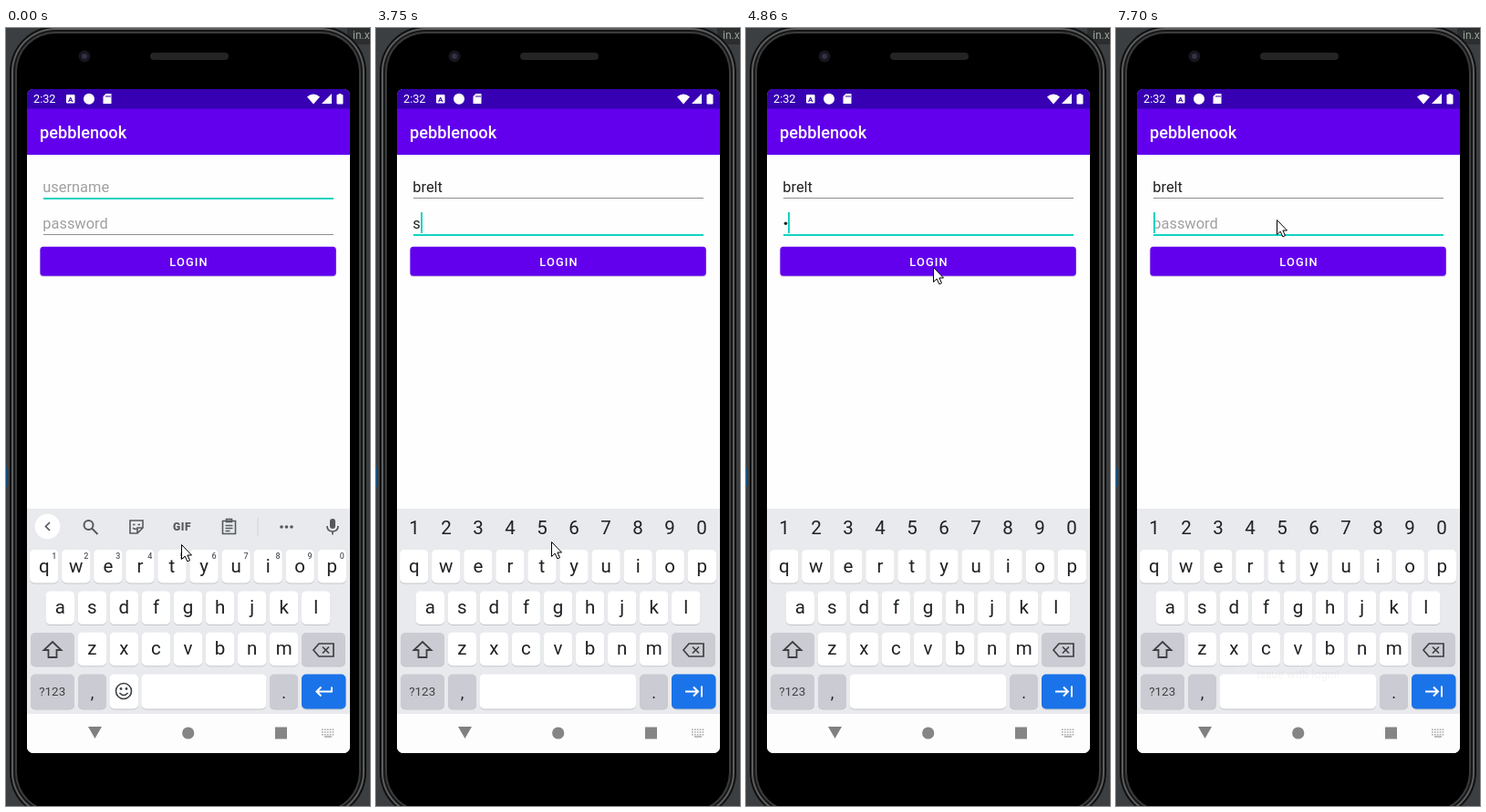
These frames come from a looping animation (399x853 px, 8000 ms). An HTML page with a canvas:

```html
<!DOCTYPE html>
<html lang="en">
<head>
<meta charset="utf-8">
<title>Login screen</title>
<style>
  html, body { margin: 0; width: 100%; height: 100%; overflow: hidden; background: #3c3f41; }
  canvas { display: block; }
</style>
</head>
<body>
<canvas id="stage" width="399" height="853"></canvas>
<script>
const ctx = document.getElementById('stage').getContext('2d');
const LOOP = 8000, BLINK = 495;
const TEAL = '#14d3bf', PURPLE = '#6200ee', INK = '#202124', ICON = '#55585d', GREY = '#cbccd3';
const USER = 'brelt', APP = 'pebblenook', FIELD_SIZE = 16.4;

// Story beats in ms
const FIRST_KEY = 680, NEXT_KEYS = 980, KEY_GAP = 130, FOCUS_PASSWORD = 1770;
const SECRET_KEY = 2760, SECRET_HIDDEN = 4350, FIELD_CLICK = 6710, SECRET_ERASED = 7340;
const PRESS = 4650, TOAST_IN = 4980, TOAST_OUT = 7720;
// Pointer moves: start, end, destination
const MOVES = [[3710, 4470, 203, 249], [4560, 5370, 211, 292], [6170, 6290, 211, 284], [6290, 6560, 176, 210]];

const clamp = (v, lo = 0, hi = 1) => Math.min(hi, Math.max(lo, v));
const smooth = k => k * k * (3 - 2 * k);

function box(x, y, w, h, fill, r = 0) {
  ctx.fillStyle = fill;
  ctx.beginPath();
  ctx.roundRect(x, y, w, h, r);
  ctx.fill();
}
function disc(x, y, r, fill) {
  ctx.fillStyle = fill;
  ctx.beginPath();
  ctx.arc(x, y, r, 0, 7);
  ctx.fill();
}
function shape(d, x, y, { fill, stroke, width = 1.7 }) {
  const path = new Path2D(d);
  ctx.save();
  ctx.translate(x, y);
  if (fill) { ctx.fillStyle = fill; ctx.fill(path); }
  if (stroke) { ctx.strokeStyle = stroke; ctx.lineWidth = width; ctx.stroke(path); }
  ctx.restore();
}
function label(str, x, y, size, color = INK, align = 'center', weight = 400, spacing = 0) {
  ctx.font = `${weight} ${size}px Roboto, sans-serif`;
  ctx.letterSpacing = spacing + 'px';
  ctx.textAlign = align;
  ctx.fillStyle = color;
  ctx.fillText(str, x, y);
}
function textWidth(str) {
  ctx.font = `400 ${FIELD_SIZE}px Roboto, sans-serif`;
  ctx.letterSpacing = '0px';
  return ctx.measureText(str).width;
}

// Letters of the user name entered by time t
function typedCount(t) {
  if (t < FIRST_KEY) return 0;
  return clamp(2 + Math.floor((t - NEXT_KEYS) / KEY_GAP), 1, USER.length);
}
// The caret restarts its blink at every edit
function caretOn(t) {
  const keys = [...USER].map((_, i) => i ? NEXT_KEYS + (i - 1) * KEY_GAP : FIRST_KEY);
  const edits = [370 - 2 * BLINK, ...keys, FOCUS_PASSWORD - 95, SECRET_KEY, FIELD_CLICK, SECRET_ERASED];
  const last = edits.findLast(e => t >= e);
  return Math.floor((t - last) / BLINK) % 2 === 0;
}

function drawPhone() {
  box(0, 0, 399, 853, '#3c3f41');
  box(374, 0, 25, 18, '#2b2d2e');
  box(0, 482, 1.5, 20, '#0d4f82');
  label('in.x', 380, 12, 12, '#9aa39a', 'left');
  ['#101010', '#5c5e60', '#161616', '#3a3b3c', '#000'].forEach((color, i) => {
    const inset = 2 * i;
    box(4 + inset, inset - 2, 391 - 2 * inset, 868 - 2 * inset, color, 50 - inset);
  });
  disc(86, 31, 6.5, '#17171c');
  disc(86, 31, 3, '#30324a');
  box(158, 27, 86, 8, '#242424', 4);
}

function drawBars() {
  box(23, 67, 354, 728, '#fefefe');
  box(23, 67, 354, 72, PURPLE);
  box(23, 67, 354, 21.6, '#3700b3');
  label(APP, 37, 121, 18.2, '#fff', 'left', 500);
  label('2:32', 30, 82, 12.7, '#fff', 'left');
  box(66, 73, 9.5, 9.5, '#fff', 1);
  label('A', 70.8, 81, 8, '#3700b3', 'center', 700);
  disc(91, 77.8, 6, '#fff');
  shape('M3 0H9V11H0V3Z', 106.5, 72, { fill: '#fff' });
  shape('M3.500 2V4M5.500 2V4M7.500 2V4', 106.5, 72, { stroke: '#3700b3', width: 1 });
  shape('M0 3Q7 -3 14 3L7 11Z', 330, 72.5, { fill: '#fff' });
  shape('M11 0V11H0Z', 346, 72, { fill: '#fff' });
  box(362.5, 73, 7, 10.5, '#fff', 1);
  box(364.5, 72, 3, 2, '#fff');

  box(23, 752, 354, 43, '#fdfdfd');
  shape('M0 0H15L7.500 13Z', 90, 766, { fill: '#808080' });
  disc(199.7, 773, 6.6, '#858585');
  box(295, 766.5, 13, 13, '#858585');
  for (let i = 0; i < 15; i++)
    box(346 + i % 5 * 2.9, 768.5 + Math.floor(i / 5) * 2.7, 1.7, 1.5, '#aaa');
  box(349, 776.3, 8, 1.4, '#aaa');
}

function field(y, { text, hint, focused, caret, composed, masked }) {
  const x = 40.3;
  if (masked) disc(43.5, y + 0.3, 1.8, INK);
  else label(text || hint, x, y + 6, FIELD_SIZE, text ? '#212121' : '#a0a0a0', 'left');
  if (composed) box(x, y + 7, textWidth(composed), 1, '#333');
  box(41, y + 12, 318, focused ? 2 : 1, focused ? TEAL : '#8e8e8e');
  if (caret) box(Math.round(x + textWidth(masked ? '•' : text) + 0.2), y - 12, 2, 23, TEAL);
}

function drawButton(t) {
  box(37.5, 241, 324, 31.8, '#cfc8da', 3.5);
  box(37.4, 239.8, 324.4, 32, PURPLE, 3.5);
  const press = clamp(2 - Math.abs(t - PRESS) / 105);
  box(37.4, 239.8, 324.4, 32, `rgba(255,255,255,${0.25 * press})`, 3.5);
  label('LOGIN', 200.5, 261, 12.75, '#fff', 'center', 500, 1.14);
}

function key(x, y, w, fill = '#fff') {
  const h = y > 700 ? 38 : 36.5;
  box(x, y + 1, w, h, '#c3c5c9', 5);
  box(x, y, w, h, fill, 5);
}

function drawToolbar() {
  shape('M3 -4.500L-1.500 0L3 4.500', 45, 546.5, { stroke: ICON });
  shape('M5 0A5 5 0 1 1 -5 0A5 5 0 1 1 5 0M3.500 3.500L10 10', 90.5, 545, { stroke: ICON, width: 2 });
  shape('M0 0H14V8L8 14H0ZM14 8H8V14M3 4.500H5.500M8.500 4.500H11M3 8Q5 10 7 9', 136, 540, { stroke: ICON, width: 1.6 });
  label('GIF', 193, 550.5, 12, ICON, 'center', 900, 0.6);
  shape('M0 2H14V16H0ZM4 3H10V0H4ZM3 7H11M3 10H11M3 13H8', 237.5, 538.5, { stroke: ICON, width: 1.6 });
  box(275.5, 537, 1, 20, '#cfd1d5');
  for (const dx of [-5.5, 0, 5.5]) disc(307.5 + dx, 547, 1.8, ICON);
}
function drawSuggestions(words) {
  shape('M-2 -4.500L2.500 0L-2 4.500', 45, 546.5, { stroke: ICON });
  words.forEach((word, i) => {
    label(word, 107 + 95 * i, 552, 15.5);
    if (i) box(58 + 95 * i, 538, 1, 18, '#cfd1d5');
  });
}
function drawStrip(typed) {
  disc(45.5, 546.5, 13.8, '#fff');
  if (typed < 3) drawToolbar();
  else drawSuggestions(typed < USER.length ? ['bread', 'break', 'brew'] : [USER, 'belt', 'built']);
  box(355, 538, 6, 11, ICON, 3);
  shape('M-6 0Q-6 6 0 6Q6 6 6 0M0 6V9.500', 358, 546, { stroke: ICON });
}

function drawKeyboard(password, typed) {
  box(23, 527, 354, 225, '#e8eaed');
  if (password) [...'1234567890'].forEach((digit, i) => label(digit, 42 + 35 * i, 554.5, 20.5));
  else drawStrip(typed);

  ['qwertyuiop', 'asdfghjkl', 'zxcvbnm'].forEach((row, r) => {
    const y = 572 + 45.4 * r;
    [...row].forEach((letter, i) => {
      const x = 199.5 + 35.05 * (i - (row.length - 1) / 2);
      key(x - 15.7, y, 31.4);
      label(letter, x, y + 24.5, 20.5);
      if (!r && !password) label((i + 1) % 10, x + 11, y + 10, 9, ICON, 'center', 500);
    });
  });

  key(27, 663, 48, GREY);
  shape('M0 -9L9.500 0H4.500V8H-4.500V0H-9.500Z', 51, 682, { stroke: '#3c4043', width: 1.8 });
  key(324, 663, 48, GREY);
  shape('M-5 -7H11V7H-5L-11 0ZM-1 -3.500L6 3.500M6 -3.500L-1 3.500', 348, 682, { stroke: '#3c4043' });
  key(27, 708.5, 48, GREY);
  label('?123', 50.7, 732, 13.4, '#3c4043');
  key(79, 708.5, 31, GREY);
  label(',', 94.5, 735, 18);
  key(289, 708.5, 31, GREY);
  label('.', 304.5, 735, 18);
  if (password) key(113.5, 708.5, 171.5);
  else {
    key(113.5, 708.5, 31.5);
    key(148.3, 708.5, 137);
    shape('M8.500 0A8.500 8.500 0 1 1 -8.500 0A8.500 8.500 0 1 1 8.500 0M-4.500 2Q0 7 4.500 2', 129, 727, { stroke: '#3c4043', width: 1.6 });
    for (const dx of [-3, 3]) disc(129 + dx, 724.5, 1.4, '#3c4043');
  }
  key(324, 708.5, 48.5, '#1a73e8');
  shape(password ? 'M-9 0H5M0 -5L5 0L0 5M9 -6V6' : 'M9 -5V0H-7M-2.500 -5L-7.500 0L-2.500 5', 348, 727.5, { stroke: '#fff', width: 2 });
}

function drawToast(t) {
  ctx.globalAlpha = clamp((t - TOAST_IN) / 500) * clamp((TOAST_OUT - t) / 400);
  box(132, 685, 135.5, 45, 'rgba(237,237,238,.97)', 22.5);
  label('Issue with login!', 154, 713, 12.7, '#222', 'left');
  ctx.globalAlpha = 1;
}

function drawPointer(t) {
  let x = 192, y = 566;
  for (const [start, end, toX, toY] of MOVES) {
    const k = smooth(clamp((t - start) / (end - start)));
    x += (toX - x) * k;
    y += (toY - y) * k;
  }
  shape('M0 0V16L3.700 12.600L6.300 18.300L9 17.200L6.400 11.500H11Z', Math.round(x) + 0.5, Math.round(y) + 0.5,
    { fill: '#fff', stroke: '#000', width: 1 });
}

function draw(t) {
  drawPhone();
  ctx.save();
  ctx.beginPath();
  ctx.roundRect(23, 67, 354, 728, 7);
  ctx.clip();
  drawBars();

  const onPassword = t >= FOCUS_PASSWORD, typed = typedCount(t), caret = caretOn(t);
  const hasSecret = t >= SECRET_KEY && t < SECRET_ERASED;
  field(174, {
    text: USER.slice(0, typed), hint: 'username', focused: !onPassword, caret: caret && !onPassword,
    composed: onPassword ? '' : USER.slice(0, typedCount(t - 150))
  });
  field(214, {
    text: hasSecret ? 's' : '', hint: 'password', focused: onPassword, caret: caret && onPassword,
    masked: hasSecret && t >= SECRET_HIDDEN
  });
  drawButton(t);
  if (hasSecret && t >= FIELD_CLICK + 120)
    shape('M0 0L6 6A8.500 8.500 0 1 1 -6 6Z', 47, 227, { fill: TEAL });
  drawKeyboard(onPassword, typed);
  drawToast(t);
  ctx.restore();
  drawPointer(t);
}

const start = performance.now();
function frame() {
  draw((performance.now() - start) % LOOP);
  requestAnimationFrame(frame);
}
frame();
</script>
</body>
</html>
```
